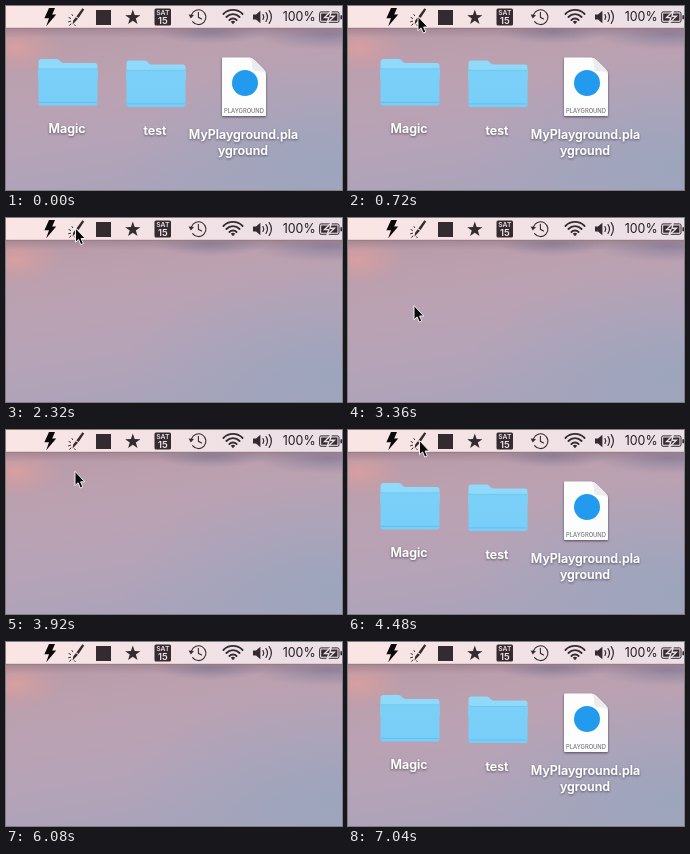
Recreate the animation shown at these times as an HTML page. Size 336 by 184 pixels, loop 7.92 s.

```html
<!DOCTYPE html>
<html lang="en">
<head>
<meta charset="utf-8">
<title>Desktop icons toggle</title>
<style>
html, body { margin: 0; width: 100%; height: 100%; overflow: hidden; background: #b7a2b4; }
svg { display: block; width: 100vw; height: 100vh; }
text { font-family: Inter, Roboto, sans-serif; text-anchor: middle; }
.label { font-size: 12.45px; font-weight: 600; fill: #fff; filter: url(#shade); }
.line { fill: none; stroke: #342b30; stroke-linecap: round; }
</style>
</head>
<body>
<svg viewBox="0 0 336 184" preserveAspectRatio="none">
  <defs>
    <linearGradient id="sky" x1="0.2" y1="0" x2="0.5" y2="1">
      <stop offset="0" stop-color="#b898a5"/>
      <stop offset="0.35" stop-color="#bba1b0"/>
      <stop offset="0.7" stop-color="#b5a3b7"/>
      <stop offset="1" stop-color="#a9a3ba"/>
    </linearGradient>
    <radialGradient id="glow">
      <stop offset="0" stop-color="#dfa09e" stop-opacity="0.8"/>
      <stop offset="1" stop-color="#d29c9e" stop-opacity="0"/>
    </radialGradient>
    <radialGradient id="blue">
      <stop offset="0" stop-color="#9aa5bd" stop-opacity="0.85"/>
      <stop offset="1" stop-color="#9aa5bd" stop-opacity="0"/>
    </radialGradient>
    <radialGradient id="dusk">
      <stop offset="0" stop-color="#837b98" stop-opacity="0.75"/>
      <stop offset="1" stop-color="#837b98" stop-opacity="0"/>
    </radialGradient>
    <linearGradient id="edge" x1="0" y1="0" x2="0" y2="1">
      <stop offset="0" stop-color="#8a6f7c" stop-opacity="0.45"/>
      <stop offset="1" stop-color="#8a6f7c" stop-opacity="0"/>
    </linearGradient>
    <linearGradient id="bar">
      <stop offset="0" stop-color="#fae5e4"/>
      <stop offset="0.5" stop-color="#f2e2e5"/>
      <stop offset="1" stop-color="#e9dfe6"/>
    </linearGradient>
    <linearGradient id="front" x1="0" y1="0" x2="0" y2="1">
      <stop offset="0" stop-color="#7bd0f8"/>
      <stop offset="1" stop-color="#77cef8"/>
    </linearGradient>
    <filter id="shade" x="-20%" y="-40%" width="140%" height="200%">
      <feDropShadow dx="0" dy="1" stdDeviation="1" flood-color="#2c2030" flood-opacity="0.7"/>
    </filter>
    <g id="folder">
      <path d="M0 3Q0 0 3 0H18Q20 0 21.5 2T25 4H56Q59 4 59 7V20H0Z" fill="#8fdafa"/>
      <path d="M0 10H59V44Q59 46.5 56.5 46.5H2.5Q0 46.5 0 44Z" fill="url(#front)"/>
      <path d="M0 9.8H59" stroke="#67bfe9" stroke-width="0.7"/>
      <path d="M0.4 43.4H58.6" stroke="#5fb9e6" stroke-width="0.7"/>
    </g>
  </defs>

  <rect width="336" height="184" fill="url(#sky)"/>
  <ellipse cx="325" cy="160" rx="210" ry="110" fill="url(#blue)"/>
  <ellipse cx="205" cy="26" rx="55" ry="12" fill="url(#dusk)"/>
  <ellipse cx="322" cy="28" rx="75" ry="16" fill="url(#dusk)"/>
  <ellipse cx="10" cy="42" rx="48" ry="26" fill="url(#glow)"/>
  <rect y="22" width="336" height="10" fill="url(#edge)"/>

  <g id="icons">
    <use href="#folder" x="32.5" y="53"/>
    <use href="#folder" x="120.5" y="54.5"/>
    <g filter="url(#shade)">
      <path d="M216 52.5Q216 51.5 217 51.5H243Q246 51.5 248.5 54L257.5 63Q260 65.5 260 68.5V109Q260 110 259 110H217Q216 110 216 109Z" fill="#fdfdfe"/>
    </g>
    <path d="M243 51.5Q246.5 53 246 60Q245.8 65.4 251 65.2Q258.5 65 260 68.5Q260 65.5 257.5 63L248.5 54Q246 51.5 243 51.5Z" fill="#ececef"/>
    <circle cx="239" cy="77" r="13" fill="#229bee"/>
    <text x="238" y="106.8" font-size="5.8" font-weight="500" fill="#77777d">PLAYGROUND</text>
    <text class="label" x="61" y="127">Magic</text>
    <text class="label" x="149" y="129">test</text>
    <text class="label" x="237.5" y="133">MyPlayground.pla</text>
    <text class="label" x="237" y="149">yground</text>
  </g>

  <rect width="336" height="22" fill="url(#bar)"/>
  <rect y="21.8" width="336" height="0.9" fill="#93797f"/>
  <g fill="#342b30">
    <path d="M43 2H49L46.2 8.6H50.2L40.2 20.3L43 12.2H38.4Z" fill="#0b090a"/>
    <path d="M76.4 2.2L78.2 3.6L72.6 12L70.4 10.4ZM69.8 11.2L72 12.8L69.4 15.6L66.6 18.4L67.2 14.4Z"/>
    <path class="line" stroke-width="1" d="M66.6 9.6L66 8.6M64.6 12.4L63 11.6M64.6 15.2L62.6 15.8M65 18L63.6 19.2M68.6 18.8L69.2 19.6"/>
    <rect x="90" y="4" width="15" height="15"/>
    <path id="star"/>
    <rect x="148.5" y="2.5" width="16.5" height="17" rx="1.5"/>
    <text x="156.8" y="9" font-size="6.8" font-weight="600" fill="#f2e4e7">SAT</text>
    <text x="156.8" y="17.8" font-size="9.4" font-weight="600" fill="#f2e4e7">15</text>
    <path class="line" stroke-width="1.1" d="M185.6 8.6A7.4 7.4 0 1 1 186.6 15.6M192.4 6.2V11.3L195.6 13"/>
    <path d="M182.6 8.6L188 9L184.8 12.4Z"/>
    <path class="line" stroke-width="1.8" stroke-linecap="butt" d="M217.4 8A13.4 13.4 0 0 1 236.6 8M220.4 11A9.2 9.2 0 0 1 233.6 11M223.4 14A5.1 5.1 0 0 1 230.6 14"/>
    <path d="M227 18.2L224.8 15.8A3.2 3.2 0 0 1 229.2 15.8Z"/>
    <path d="M247 8.5H250L254.4 4.8V17.2L250 13.5H247Z"/>
    <path class="line" stroke-width="1.2" d="M257 8.6Q258.6 11 257 13.4M260 6.6Q263 11 260 15.4M263.2 4.6Q267.6 11 263.2 17.4"/>
    <text x="293.2" y="15.2" font-size="12.4" font-weight="400" fill="#211b1f">100%</text>
    <rect x="313.6" y="5.9" width="19.4" height="10.4" rx="1.5" fill="none" stroke="#342b30" stroke-width="1"/>
    <rect x="315.2" y="7.5" width="16.2" height="7.2"/>
    <path d="M325.2 5L318.6 11.6H322.8L321 17.2L328.4 10.2H324Z" stroke="#eadfe4" stroke-width="1.4"/>
    <path d="M334.4 9.2H336V13.2H334.4Z"/>
  </g>

  <path id="cursor" d="M0 0V14.2L3.1 11.4L5.3 16.6L7.8 15.5L5.6 10.5H9.8Z"
        fill="#0a0a0a" stroke="#fff" stroke-width="0.9" stroke-linejoin="round"/>
</svg>
<script>
const LOOP = 7920, STEP = 80;
const byId = id => document.getElementById(id);
const icons = byId('icons'), cursor = byId('cursor');

// Pointer stops: time, x, y
const stops = [
  [0, 86, 192], [160, 84, 150], [320, 76, 58], [480, 71, 12],
  [560, 71, 12], [880, 69, 9], [960, 69, 9], [1120, 69.5, 10],
  [2400, 69.5, 10], [2560, 70, 12],
  [2720, 70, 12], [2960, 68, 40], [3200, 66, 80], [3360, 66, 87.5],
  [3600, 66, 87.5], [3840, 68, 55], [4080, 71, 14], [4240, 71.5, 10.5],
  [5040, 71.5, 10.5], [5280, 76, 56], [5520, 78, 88], [5840, 80, 113],
  [6000, 82, 156], [6080, 84, 192], [LOOP, 86, 192]
];
// Moments at which the desktop icons flip between shown and hidden
const clicks = [1440, 4320, 4720, 7040];

byId('star').setAttribute('d', 'M' + Array.from({ length: 10 }, (_, i) => {
  const r = i % 2 ? 3.2 : 8, a = i * Math.PI / 5;
  return (126.8 + r * Math.sin(a)).toFixed(2) + ' ' + (11.6 - r * Math.cos(a)).toFixed(2);
}).join('L') + 'Z');

function pointAt(t) {
  const i = stops.findIndex(s => s[0] > t);
  const [t0, x0, y0] = stops[i - 1], [t1, x1, y1] = stops[i];
  const k = (t - t0) / (t1 - t0);
  return [x0 + (x1 - x0) * k, y0 + (y1 - y0) * k];
}

function draw(ms) {
  const t = Math.floor((ms % LOOP) / STEP) * STEP;
  const hidden = clicks.filter(c => c <= t).length % 2;
  icons.style.display = hidden ? 'none' : '';
  cursor.setAttribute('transform', `translate(${pointAt(t)})`);
}

const start = performance.now();
function tick() {
  draw(performance.now() - start);
  requestAnimationFrame(tick);
}
draw(0);
requestAnimationFrame(tick);
</script>
</body>
</html>
```
